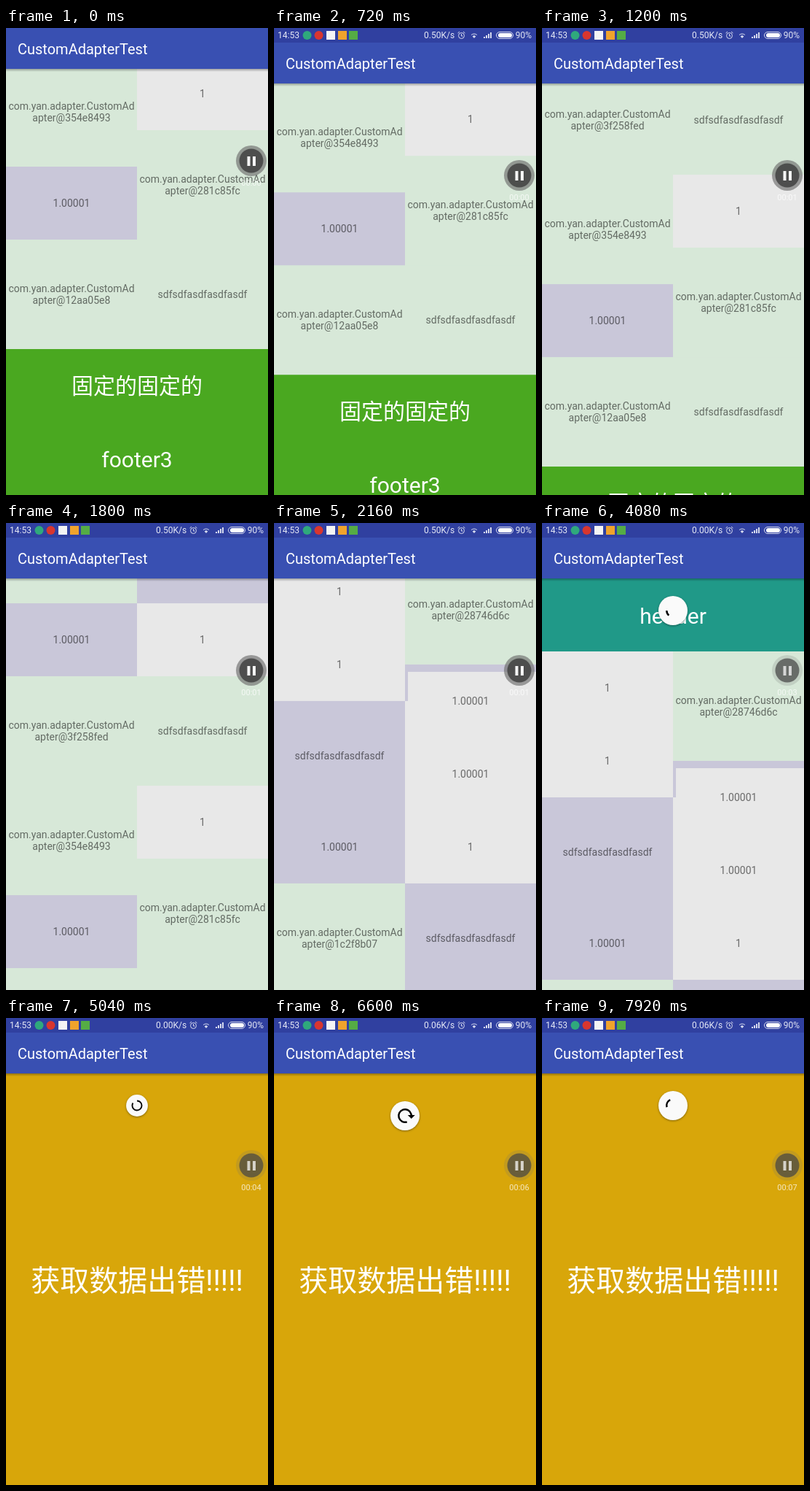
An HTML page with a canvas that plays this animation: 360 by 640 pixels, repeating every 8 s.

```html
<!DOCTYPE html>
<html lang="en">
<head>
<meta charset="utf-8">
<title>CustomAdapterTest</title>
<style>
  html, body { margin: 0; width: 100%; height: 100%; overflow: hidden; }
  canvas { display: block; }
</style>
</head>
<body>
<canvas id="stage" width="360" height="640"></canvas>
<script>
const ctx = document.getElementById('stage').getContext('2d');
const LOOP = 8000, TOP = 76, TURN = Math.PI * 2;
const GRAY = '#e8e8e8', LAVENDER = '#c9c7d9', MINT = '#d7e8d8';
const ERROR_AT = 4920;

const one = [GRAY, 100, '1'];
const decimal = [LAVENDER, 100, '1.00001'];
const word = color => [color, 150, 'sdfsdfasdfasdfasdf'];
const object = id => [MINT, 150, 'com.yan.adapter.CustomAd', 'apter@' + id];
const columns = [
  [one, one, word(LAVENDER), decimal, object('1c2f8b07'), decimal,
    object('3f258fed'), object('354e8493'), decimal, object('12aa05e8')],
  [object('28746d6c'), [GRAY, 100, '1.00001'], [GRAY, 100, '1.00001'], one, word(LAVENDER),
    one, word(MINT), one, object('281c85fc'), word(MINT)]
];

const clamp = x => Math.min(1, Math.max(0, x));
const mix = (a, b, u) => a + (b - a) * u;
const ramp = (t, from, to) => clamp((t - from) / (to - from));
const smooth = u => u * u * (3 - 2 * u);
const easeOut = u => 1 - (1 - u) * (1 - u);

// cubic-bezier(.4, 0, .2, 1)
function fastOutSlowIn(x) {
  let lo = 0, hi = 1;
  for (let i = 0; i < 16; i++) {
    const s = (lo + hi) / 2, r = 1 - s;
    if (1.2 * r * r * s + 0.6 * r * s * s + s * s * s < x) lo = s; else hi = s;
  }
  return 3 * (1 - lo) * lo * lo + lo * lo * lo;
}

function rect(color, x, y, w, h) {
  ctx.fillStyle = color;
  ctx.fillRect(x, y, w, h);
}

function disc(color, x, y, r) {
  ctx.fillStyle = color;
  ctx.beginPath();
  ctx.arc(x, y, r, 0, TURN);
  ctx.fill();
}

function text(str, x, y, size, color = '#fff', align = 'center') {
  ctx.font = `${size}px Roboto, "Noto Sans CJK SC", "Noto Sans CJK", sans-serif`;
  ctx.textAlign = align;
  ctx.fillStyle = color;
  ctx.fillText(str, x, y + size * 0.36);
}

function scrollAt(t) {
  if (t < 720) return mix(966, 951, smooth(ramp(t, 240, 720)));
  if (t < 1800) return mix(951, 668, ramp(t, 720, 1800));
  return mix(668, 0, easeOut(ramp(t, 1800, 2450)));
}

function drawList(scroll) {
  const origin = TOP - scroll;
  rect('#209988', 0, origin, 360, 100);
  text('header', 180, origin + 51, 30);
  columns.forEach((tiles, col) => {
    let y = origin + 100;
    tiles.forEach(([color, height, ...lines], row) => {
      if (y < 640 && y + height > 0) {
        rect(color, col * 180, y, 180, height + 0.5);
        if (col === 1 && row === 1) {
          rect(LAVENDER, 180, y, 180, 10);
          rect(LAVENDER, 180, y, 4, 50);
        }
        lines.forEach((line, i) =>
          text(line, col * 180 + 90, y + height / 2 + 16 * i - 8 * (lines.length - 1), 14, 'rgba(0,0,0,.54)'));
      }
      y += height;
    });
  });
  rect('#4aa820', 0, origin + 1350, 360, 240);
  text('固定的固定的', 180, origin + 1400, 30);
  text('footer3', 180, origin + 1501, 30);
}

// Angles in degrees, clockwise; the arc ends at `end`.
function drawSpinner(y, end, sweep, { scale = 1, alpha = 1, arrow = false } = {}) {
  ctx.save();
  ctx.globalAlpha = alpha;
  ctx.translate(180, y);
  ctx.scale(scale, scale);
  ctx.shadowColor = 'rgba(0,0,0,.4)';
  ctx.shadowBlur = 3;
  ctx.shadowOffsetY = 1;
  disc('#fafafa', 0, 0, 20);
  ctx.shadowColor = 'transparent';
  ctx.rotate(end * TURN / 360);
  ctx.strokeStyle = ctx.fillStyle = '#000';
  ctx.lineWidth = 2.5;
  ctx.beginPath();
  ctx.arc(0, 0, 8.75, -sweep * TURN / 360, 0);
  ctx.stroke();
  if (arrow) {
    ctx.beginPath();
    ctx.moveTo(3.75, -1);
    ctx.lineTo(13.75, -1);
    ctx.lineTo(8.75, 4);
    ctx.fill();
  }
  ctx.restore();
}

function drawSpinning(t, start, phase, y, scale) {
  const p = (t - start) / 1332, cycle = Math.floor(p), f = p - cycle;
  const tail = 0.8 * fastOutSlowIn(clamp(2 * f - 1));
  const head = 0.8 * fastOutSlowIn(clamp(2 * f)) + 0.04;
  drawSpinner(y, 360 * (0.8 * cycle + head) + 144 * p + phase, 360 * (head - tail), { scale });
}

function drawRefresh(t) {
  if (t >= 2520 && t < 5160) {
    const scale = 1 - smooth(ramp(t, 4980, 5160)) * 0.95;
    drawSpinning(t, 1681, 50, mix(56, 120, ramp(t, 2520, 2720)), scale);
  } else if (t >= 6000 && t < 6920) {
    const pull = easeOut(ramp(t, 6000, 6240)), release = smooth(ramp(t, 6620, 6820));
    const shrink = ramp(t, 6720, 6920);
    drawSpinner(mix(mix(56, 134, pull), 120, release), mix(-150, 0, pull) + 207 * shrink,
      mix(288 * pull, 14, shrink), { alpha: mix(0.3, 1, pull), arrow: shrink === 0 });
  } else if (t >= 6920) {
    drawSpinning(t, 6920, 193, 120, 1);
  }
}

function drawStatusBar(t) {
  rect('#3040a0', 0, 0, 360, 20);
  text('14:53', 5, 10, 12, '#e4e7f5', 'left');
  disc('#2fa97c', 45.5, 10, 6);
  disc('#d8362f', 61.5, 10, 6);
  rect('#f4f4f4', 72, 4, 12, 12);
  rect('#f0a32c', 88, 4, 12, 12);
  rect('#55ac45', 103, 4, 12, 12);
  const speed = t < 2400 ? '0.50' : t < 6000 ? '0.00' : '0.06';
  text(speed + 'K/s', 206, 10, 12, '#e4e7f5', 'left');

  const ink = '#d5d9ee';
  ctx.strokeStyle = ink;
  ctx.lineWidth = 1;
  ctx.beginPath();
  ctx.arc(257.5, 10.5, 4, 0, TURN);
  ctx.moveTo(257.5, 8); ctx.lineTo(257.5, 11); ctx.lineTo(259.5, 11);
  ctx.moveTo(252.5, 7); ctx.lineTo(255, 5);
  ctx.moveTo(260, 5); ctx.lineTo(262.5, 7);
  ctx.stroke();
  ctx.beginPath();
  ctx.arc(275, 14, 6, -2.3, -0.84);
  ctx.stroke();
  ctx.beginPath();
  ctx.arc(275, 14, 3.5, -2.3, -0.84);
  ctx.lineTo(275, 14);
  ctx.fillStyle = ink;
  ctx.fill();
  for (let i = 0; i < 4; i++) rect(ink, 288 + 3 * i, 12 - 2 * i, 2, 2 + 2 * i);
  ctx.beginPath();
  ctx.roundRect(305.5, 5.5, 23, 9, 4.5);
  ctx.stroke();
  ctx.beginPath();
  ctx.roundRect(308, 7, 19, 6, 3);
  ctx.fillStyle = '#fff';
  ctx.fill();
  text('90%', 354, 10, 12, '#e4e7f5', 'right');
}

function drawAppBar() {
  const shadow = ctx.createLinearGradient(0, TOP, 0, TOP + 4);
  shadow.addColorStop(0, 'rgba(0,0,0,.3)');
  shadow.addColorStop(1, 'rgba(0,0,0,0)');
  rect(shadow, 0, TOP, 360, 4);
  rect('#3950b2', 0, 20, 360, 56);
  text('CustomAdapterTest', 16, 49, 20, '#fff', 'left');
}

function drawRecorder(t) {
  const fade = ramp(t, 2400, 2700);
  disc(`rgba(110,110,110,${mix(0.65, 0.2, fade)})`, 337, 202, 21);
  disc(`rgba(70,70,70,${mix(0.9, 0.72, fade)})`, 337, 202, 16.5);
  const bar = `rgba(255,255,255,${mix(0.95, 0.72, fade)})`;
  rect(bar, 331.5, 196, 4, 13);
  rect(bar, 339, 196, 4, 13);
  const seconds = Math.max(0, Math.floor((t - 200) / 1000));
  text('00:0' + seconds, 337, 232, 11, 'rgba(255,255,255,.75)');
}

function draw(t) {
  rect(MINT, 0, 0, 360, 640);
  ctx.save();
  ctx.translate(0, mix(-20, 0, smooth(ramp(t, 240, 480))));
  if (t < ERROR_AT) {
    drawList(scrollAt(t));
  } else {
    rect('#d8a60a', 0, TOP, 360, 564);
    text('获取数据出错!!!!!', 180, 359.5, 40);
  }
  drawRefresh(t);
  drawAppBar();
  drawStatusBar(t);
  drawRecorder(t);
  ctx.restore();
}

const began = performance.now();
function tick() {
  draw((performance.now() - began) % LOOP);
  requestAnimationFrame(tick);
}
tick();
</script>
</body>
</html>
```
